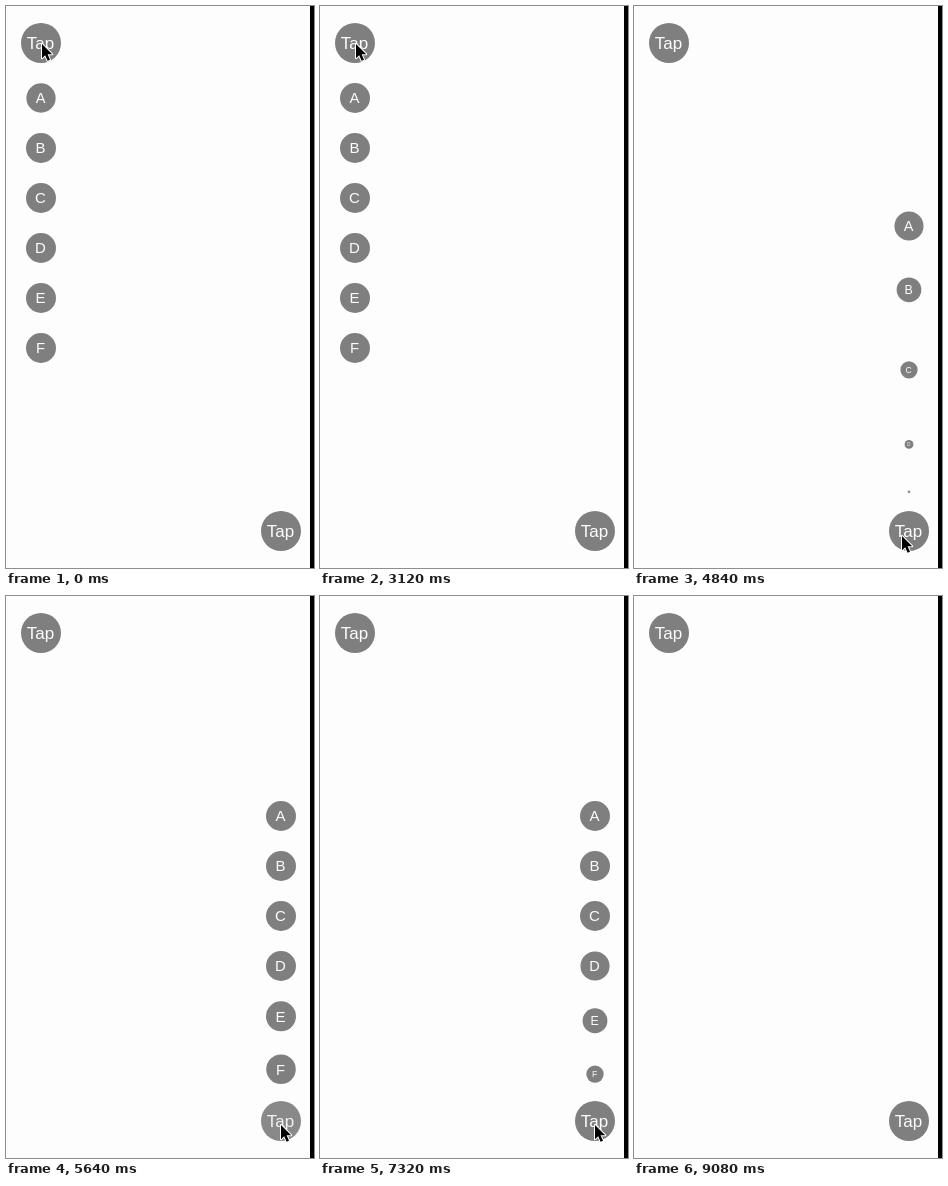
Recreate the animation shown at these times as an HTML page with a canvas. Size 308 by 562 pixels, loop 9.84 s.

```html
<!DOCTYPE html>
<html lang="en">
<head>
<meta charset="utf-8">
<title>Bubble menus</title>
<style>
  html, body { margin: 0; width: 100%; height: 100%; overflow: hidden; background: #fdfdfd; }
  canvas { display: block; }
</style>
</head>
<body>
<canvas id="stage" width="308" height="562"></canvas>
<script>
const ctx = document.getElementById('stage').getContext('2d');
const LOOP = 9840;
const MOVE = 250;        // length of one bubble's move
const SCALE_LAG = 30;    // scaling trails the move
const PRESS = 70;        // finger down before the menu reacts
const FONT = '"Liberation Sans", Arial, sans-serif';
const BG = '#fdfdfd', GRAY = '#7f7f7f', INK = '#fdfdfd';
const LABELS = [...'ABCDEF'];

// taps: [release time, opens]
const menus = [
  { x: 35, y: 37, dir: 1, labels: LABELS,
    taps: [[-460, true], [788, false], [2068, true], [3230, false]] },
  { x: 275, y: 525, dir: -1, labels: [...LABELS].reverse(),
    taps: [[-1000, false], [4592, true], [5588, false], [6946, true], [8588, false]] },
];

// pointer: [time, x, y]
const path = [
  [0, 36, 38], [3820, 36, 38], [4400, 267, 540], [4540, 268, 530], [4920, 268, 530],
  [5040, 288, 533], [5160, 275, 529], [7900, 275, 529], [8200, 288, 531], [8460, 275, 529],
];
const POINTER_END = 9080;
const arrow = new Path2D('M0 0V14.2L3.2 11.2L5.6 16.8L8 15.8L5.6 10.3H10.2Z');

const clamp = v => Math.min(1, Math.max(0, v));
const mix = (a, b, p) => a + (b - a) * p;

// cubic-bezier(.42, 0, .58, 1)
function ease(v) {
  v = clamp(v);
  let lo = 0, hi = 1;
  for (let i = 0; i < 18; i++) {
    const s = (lo + hi) / 2, r = 1 - s;
    if (3 * r * r * s * 0.42 + 3 * r * s * s * 0.58 + s ** 3 < v) lo = s; else hi = s;
  }
  return lo * lo * (3 - 2 * lo);
}

function disc(x, y, radius, label, size, scale = 1, alpha = 1) {
  ctx.save();
  ctx.translate(x, y);
  ctx.scale(scale, scale);
  ctx.globalAlpha = alpha;
  ctx.fillStyle = GRAY;
  ctx.beginPath();
  ctx.arc(0, 0, radius, 0, Math.PI * 2);
  ctx.fill();
  ctx.fillStyle = INK;
  ctx.font = `${size}px ${FONT}`;
  ctx.textAlign = 'center';
  ctx.fillText(label, -0.5, size * 0.36);
  ctx.restore();
}

// the button dims while pressed, then recovers
function homeAlpha(taps, t) {
  const tap = taps.findLast(([at]) => at - PRESS <= t);
  const since = t - tap[0];
  const dip = 0.55 * ease((Math.min(since, 0) + PRESS) / MOVE);
  return 1 - dip * (1 - ease(since / MOVE));
}

function drawMenu({ x, y, dir, labels, taps }, t) {
  disc(x, y, 20, 'Tap', 17, 1, homeAlpha(taps, t));
  const [at, opens] = taps.findLast(([start]) => start <= t);
  const edge = y + dir * 20, count = labels.length;
  labels.forEach((label, i) => {
    // opening starts with the farthest bubble, closing with the nearest
    const order = opens ? count - 1 - i : i;
    const local = t - at - order * MOVE / count;
    const moved = ease(local / MOVE);
    const scaled = ease((local - SCALE_LAG) / MOVE);
    const out = opens ? moved : 1 - moved;
    const scale = opens ? scaled : 1 - scaled;
    if (scale > 0.01) disc(x, mix(edge, edge + dir * (35 + 50 * i), out), 15, label, 15, scale);
  });
}

function drawPointer(t) {
  if (t >= POINTER_END) return;
  const i = path.findLastIndex(([at]) => at <= t);
  const a = path[i], b = path[i + 1] || a;
  const p = ease((t - a[0]) / (b[0] - a[0] || 1));
  ctx.save();
  ctx.translate(mix(a[1], b[1], p), mix(a[2], b[2], p));
  ctx.lineJoin = 'round';
  ctx.lineWidth = 2;
  ctx.strokeStyle = '#fff';
  ctx.stroke(arrow);
  ctx.fillStyle = '#000';
  ctx.fill(arrow);
  ctx.restore();
}

function draw(t) {
  ctx.fillStyle = BG;
  ctx.fillRect(0, 0, 308, 562);
  menus.forEach(menu => drawMenu(menu, t));
  ctx.fillStyle = '#000';
  ctx.fillRect(304, 0, 4, 562);
  drawPointer(t);
}

const begin = performance.now();
function tick() {
  draw((performance.now() - begin) % LOOP);
  requestAnimationFrame(tick);
}
tick();
</script>
</body>
</html>
```
